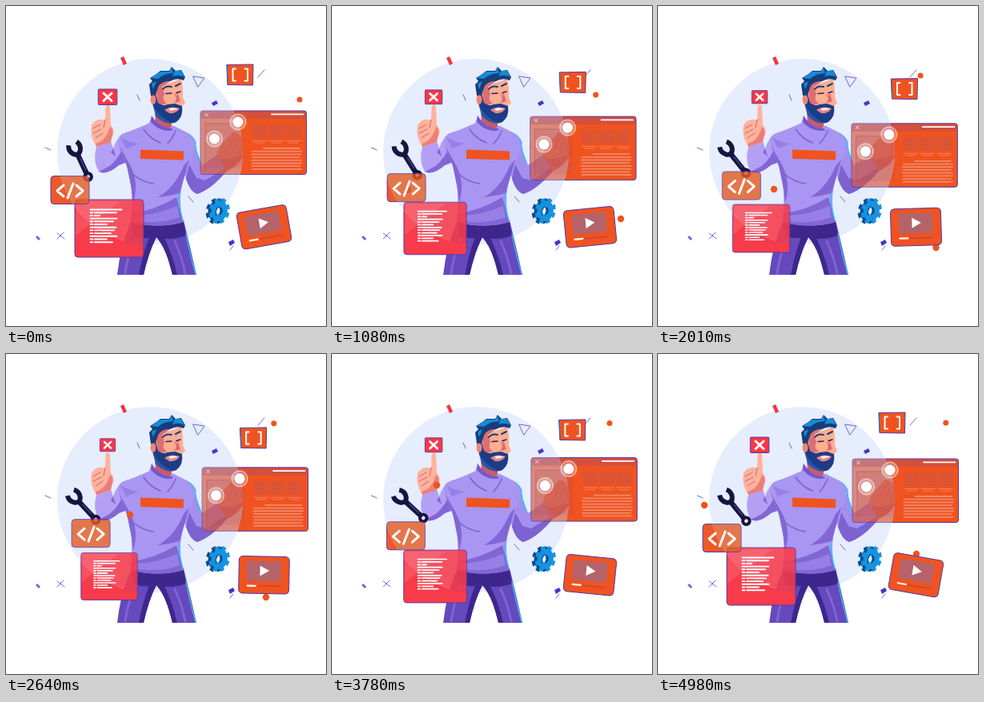
These frames come from a looping animation (400 px wide and 400 px high, 5.01 s). An HTML page:

```html
<!DOCTYPE html>
<html lang="en">
<head>
<meta charset="utf-8">
<title>Developer at work</title>
<style>
  html, body { margin: 0; width: 100%; height: 100%; overflow: hidden; background: #fff; }
  svg { display: block; width: 100vw; height: 100vh; }
  .line { fill: none; stroke-linecap: round; stroke-linejoin: round; }
</style>
</head>
<body>
<svg viewBox="0 0 400 400">
  <defs>
    <clipPath id="inside"><circle cx="180" cy="182" r="116"/></clipPath>
    <clipPath id="outside"><path clip-rule="evenodd" d="M0 0H400V400H0ZM64 182a116 116 0 1 0 232 0a116 116 0 1 0 -232 0"/></clipPath>
  </defs>
  <circle cx="180" cy="182" r="116" fill="#e6edfd"/>

  <!-- scattered confetti -->
  <path fill="#ee3547" d="M143 65l4-2 4 9-4 2z"/>
  <path fill="#4934c6" d="M257 121l6-3 2 4-6 3zM278 295l6-3 2 4-6 4z"/>
  <path fill="#7462cf" d="M37 289l2-2 4 4-2 2z"/>
  <path class="line" stroke="#6556c8" stroke-width=".9" d="M234 88l14 2-8 11zM164 111l3 7M315 89l8-9M228 238l6 7M280 305l4-5M49 177l7 3M64 284l9 7M72 283l-8 8"/>

  <!-- gear -->
  <g fill="none" transform="translate(266 256) rotate(12) scale(.78 1)">
    <g stroke="#0c4b8e" transform="translate(-4 1)"><circle r="9.5" stroke-width="7"/><circle r="14" stroke-width="5" stroke-dasharray="6 5"/></g>
    <g stroke="#1593e0" transform="translate(1 0)"><circle r="9" stroke-width="8"/><circle r="14" stroke-width="5" stroke-dasharray="6 5"/></g>
    <path class="line" stroke="#0c4b8e" stroke-width="1.5" d="M-3 6Q-6 0-2-5"/>
  </g>

  <!-- trousers -->
  <path fill="#6549bd" d="M157 268H222Q230 300 238 336H208L203 318Q197 298 188 289Q179 306 172 336H139Q143 299 157 268Z"/>
  <path fill="#3d278c" d="M156 270H222L225 287Q206 294 188 289Q172 292 160 288ZM188 289Q178 308 172 336H166Q172 305 180 287ZM188 289L197 288Q209 313 214 336H208Q201 304 188 289Z"/>
  <path class="line" stroke="#27c6f4" stroke-width="1.3" d="M225 285Q229 307 237 335"/>
  <path class="line" stroke="#8063d6" stroke-width="3" d="M161 292Q152 311 149 334M211 294Q220 314 224 334"/>

  <!-- right hand and sleeve -->
  <path fill="#f08c76" d="M263 189Q265 176 273 169L283 158Q290 155 296 167Q301 178 296 190Q288 202 274 207Z"/>
  <path fill="#d2636e" d="M264 188Q272 194 282 190L297 186Q288 202 274 207Z"/>
  <path class="line" stroke="#d2636e" d="M279 177l5-12M285 181l5-14M290 186l5-14"/>
  <path fill="#a38fee" d="M226 159Q237 164 238 180L245 199 264 186 276 206Q257 229 239 235Q230 232 225 216L219 190Z"/>
  <path fill="#7d62d2" d="M229 198L238 215 249 218 274 203 276 206Q257 229 239 235Q230 232 225 216Z"/>

  <!-- left sleeve and hand -->
  <path fill="#b3a0f5" d="M152 157Q138 163 134 178L131 169 113 176Q108 194 116 207Q126 212 141 199L155 190Z"/>
  <path fill="#8266d5" d="M145 180L152 195 141 199Q126 212 116 207L124 203Q136 198 145 180ZM134 178L137 188 131 183Z"/>
  <path fill="#ffb39c" d="M113 176Q104 163 107 149Q113 139 124 143L124.5 126Q127 120 130 126L131 149Q137 154 133 163L131 170Z"/>
  <path fill="#ed7d78" d="M130 151Q136 155 132 164L131 170 113 176 112 172Q125 169 130 151Z"/>
  <path class="line" stroke="#d45e70" d="M109 153l9-5M109 159l10-5M112 165l9-6M124 142l-2 10"/>

  <!-- sweater -->
  <path fill="#a995f2" d="M180 146Q160 155 145 160Q137 166 141 174L151 200Q160 225 156 270Q190 279 222 270Q214 243 222 217L238 171Q235 162 226 158L210 150Z"/>
  <path fill="#8266d5" d="M141 174L154 197Q167 220 159 246L157 229 151 200ZM157 259Q185 256 213 239Q217 253 222 270Q190 279 156 270ZM222 200L229 192 217 234Q202 238 190 239Q211 227 222 200Z"/>
  <path fill="#9680e6" d="M160 262Q186 262 214 250L217 264Q190 274 159 268ZM143 164Q152 170 166 172L150 178Z"/>
  <path class="line" stroke="#7a60cf" stroke-width="1.5" d="M172 154Q180 166 193 171M212 156Q208 166 202 172M158 210Q170 220 184 222"/>
  <path class="line" stroke="#27c6f4" stroke-width="1.3" d="M229 161Q237 167 238 182L243 197M216 235Q216 252 221 268"/>
  <path fill="#f0531f" d="M168 179.5L222 181.500V192.500L168 191Z"/>

  <!-- head -->
  <path fill="#c95a6b" d="M186 128L187 151Q198 163 207 150V139Z"/>
  <path fill="#a995f2" d="M182 137Q191 152 207 153L211 158Q200 166 190 161L178 150Z"/>
  <path fill="#7457c8" d="M182 137Q191 152 207 153L209 155Q194 159 181 145Z"/>
  <path fill="#ffae91" d="M187 97Q205 99 219 90Q222 104 221 114L224 121 219 126Q216 140 206 144Q191 142 186 128Z"/>
  <path fill="#dd6d74" d="M187 95L205 94 195 101 198 110Q194 117 201 122L190 124ZM214 107l4 12-6 2z"/>
  <path fill="#1c3c86" d="M181 107L187 109 190 121Q196 126 202 123L211 122 220 125Q222 138 213 145Q204 149 195 143Q183 134 181 107Z"/>
  <path fill="#2855a7" d="M183 121Q190 139 208 146Q195 147 187 137Z"/>
  <path fill="#e88585" d="M198 130Q206 124 217 128Q213 135 204 134Z"/>
  <path fill="#fff" d="M203 128.500Q209 126.500 215 128.500L206 131Z"/>
  <ellipse cx="184" cy="117" rx="3.500" ry="6" fill="#f08478"/>
  <path fill="#173d79" d="M181 112L179 98 183 94 180 90 188 85 193 81 204 81 207 76 212 81 219 80 224 89 222 93Q214 89 205 94Q193 94 190 102L187 111Z"/>
  <path fill="#148bd9" d="M181 90L193 82 204 82 207 77 209 84Q198 84 190 91ZM211 81L219 81 223 89Q217 85 208 88ZM182 97L188 94 184 104Z"/>
  <path class="line" stroke="#173d79" stroke-width="2" d="M196 104Q200 99 207 101M212 100L218 97"/>
  <path class="line" stroke="#24235e" stroke-width="1.500" d="M200 109.500L207 109M213 108.500L218 107"/>
  <path class="line" stroke="#d45e70" d="M211 110L215 118 211 120"/>

  <g id="balls" fill="#f0531f"></g>

  <g id="wrench">
    <path fill="none" stroke="#18143f" stroke-width="6.500" d="M94 180H123"/>
    <path fill="none" stroke="#18143f" stroke-width="6" d="M78 174.500Q84 171 90 175Q96 180 90 185Q84 189 78 185.500"/>
    <circle cx="124" cy="180" r="4.300" fill="#e6edfd" stroke="#18143f" stroke-width="4"/>
    <path class="line" stroke="#4a47a4" stroke-width="1.200" d="M99 179H115"/>
  </g>
  <g id="cards"></g>
</svg>

<script>
const $ = id => document.getElementById(id);
const line = (d, width = 1, color = '#fff', opacity = 1) =>
  `<path class="line" d="${d}" stroke="${color}" stroke-width="${width}" opacity="${opacity}"/>`;
const box = (x, y, w, h, r = 3) => `<rect x="${x}" y="${y}" width="${w}" height="${h}" rx="${r}"/>`;
const tint = (shape, opacity, color = '#ffe4e5') => `<g fill="${color}" opacity="${opacity}">${shape}</g>`;

// Each card is see-through over the disc and solid beyond its edge.
function addCard(name, shape, color, inner, alpha, content) {
  const base = fill => `<g class="${name}" fill="${fill}" stroke="#5636ac">${shape}</g>`;
  $('cards').innerHTML += `<g clip-path="url(#inside)" opacity="${alpha}">${base(inner)}</g>
    <g clip-path="url(#outside)">${base(color)}</g><g class="${name}">${content}</g>`;
}

const listRows = [39, 32, 11, 33, 28, 20, 32, 29, 25, 33, 20, 27];
const listText = listRows.map((w, i) =>
  line(`M105.5 ${254.5 + i * 3.7}h${i % 3 ? 3 : w}` +
    (i % 3 ? `m2.5 0h${w - 5}` : ''), 1.9)).join('');

const touch = (x, y) => `<circle cx="${x}" cy="${y}" r="11" fill="#fff" opacity=".22"/>
  <circle cx="${x}" cy="${y}" r="9.5" fill="none" stroke="#fff" stroke-width=".8" opacity=".8"/>
  <circle cx="${x}" cy="${y}" r="6.5" fill="#fff"/>`;

let page = tint(box(243.5, 131.5, 132, 9.5, 2), .3, '#8c4a80') +
  tint(box(248, 146, 48, 57, 1), .14, '#8c4a80') +
  line('M248.5 134l4 4m0-4l-4 4', 1, '#fff', .7) + line('M332 135.3H371.5', 1.7) +
  line('M249 147H296M249 147V205', .7, '#9f4c66', .5);
for (const x of [308, 329, 350])
  page += tint(box(x, 148, 18.5, 17, 1), .22, '#9a5a80') + line(`M${x} 168.5h18m-15 2.5h12`, 1, '#f0a08a', .6);
for (let i = 0; i < 8; i++)
  page += line(`M${i ? 307 + i % 2 : 322} ${178 + i * 3.7}H${i % 3 ? 369 : 367}`, 1.8, '#f0a593', .65);
page += touch(260.5, 166) + touch(290, 145);

addCard('list', box(86, 242, 86, 72, 4), '#f73b4a', '#f73b4a', .88,
  tint('<path d="M88 244H143L87 287Z"/>', .12) + listText);
addCard('code', box(56, 212.5, 48, 35, 4), '#ed5929', '#e35c24', .82,
  line('M72 224L64 231 72 238M84 222L77 240M88 224L96 231 88 238', 3));
addCard('win', box(243, 131, 132.5, 79.5), '#f0531f', '#d9593a', .68, page);
addCard('bracket', '<path d="M275.8 73.5L309 73 308.5 99 277 98.5Z"/>', '#f0531f', '#f0531f', 1,
  line('M276.3 74L277.3 98', .9, '#2479c4') +
  line('M287 78.5H283.5V93.5H287M298.5 78.5H302V93.5H298.5', 2));
addCard('cross', box(115.3, 104, 23.5, 19.5, 1), '#fa3746', '#fa3746', 1,
  line('M122 109l10 9.5m0-9.5l-10 9.5', 3));
addCard('video', box(291, 253, 63, 46.5, 5), '#f0531f', '#f0531f', 1,
  tint(box(300.5, 259, 43, 25, 1), 1, '#b56369') +
  '<path fill="#fff" d="M317.5 264.5L329 271 317.5 277.5Z"/>' +
  line('M302 290H312', 2.2) + line('M315 290H343', 1.5, '#b74343', .8));

// Tracks are [seconds, x, y] corners joined by straight runs.
const ballTracks = [
  [[0, 367, 117], [1.1, 329, 111], [2, 328, 87], [5, 360, 86]],
  [[0, 322, 276], [.5, 339, 271], [1.08, 361, 266], [2.01, 347.5, 302], [2.64, 325, 304], [4.98, 323, 250]],
  [[0, 62, 229], [.27, 46, 231], [.54, 66, 230], [2.01, 145, 229], [2.64, 155, 201], [3.45, 154, 164],
    [3.78, 131, 164], [4.86, 65, 178], [4.98, 58, 189]]
];
const winTrack = [[0, 0, 0], [1.14, 4.8, 7.5], [2.13, -2, 17], [3.5, 9, .5], [4.3, 0, -5], [4.8, 0, 0]];
const wrenchTrack = [[0, 65, 0], [3.55, 41, 0], [4.98, 51, 0]];

function along(track, t) {
  const i = track.findIndex(k => k[0] > t);
  if (i < 0) return track[track.length - 1].slice(1);
  const [a, b] = [track[i - 1], track[i]], f = (t - a[0]) / (b[0] - a[0]);
  return [1, 2].map(n => a[n] + (b[n] - a[n]) * f);
}

$('balls').innerHTML = ballTracks.map((_, i) => `<circle r="${i ? 4.2 : 3.5}"/>`).join('');
const balls = [...$('balls').children];
const pose = (name, value) =>
  document.querySelectorAll('.' + name).forEach(el => el.setAttribute('transform', value));
const shrink = (x, y, s) => `translate(${x} ${y}) scale(${s}) translate(${-x} ${-y})`;

function draw(now) {
  const t = Math.floor(now % 5010 / 30) * .03;
  const p = Math.max(0, 1 - Math.abs(t - 2.4) / 2.4);
  pose('list', shrink(129, 278, 1 - .2 * p));
  pose('cross', shrink(127, 114, 1 - .2 * p));
  pose('code', `translate(${29 * p} ${-6.5 * p})`);
  pose('bracket', `translate(${18.5 * p} ${21 * p})`);
  pose('win', `translate(${along(winTrack, t)})`);
  pose('video', `rotate(${-10 + 20 * Math.min(1, t / 4.8)} 322.5 276)`);
  $('wrench').setAttribute('transform', `rotate(${along(wrenchTrack, t)[0]} 87 180)`);
  balls.forEach((ball, i) => ball.setAttribute('transform', `translate(${along(ballTracks[i], t)})`));
  requestAnimationFrame(draw);
}
draw(0);
</script>
</body>
</html>
```
